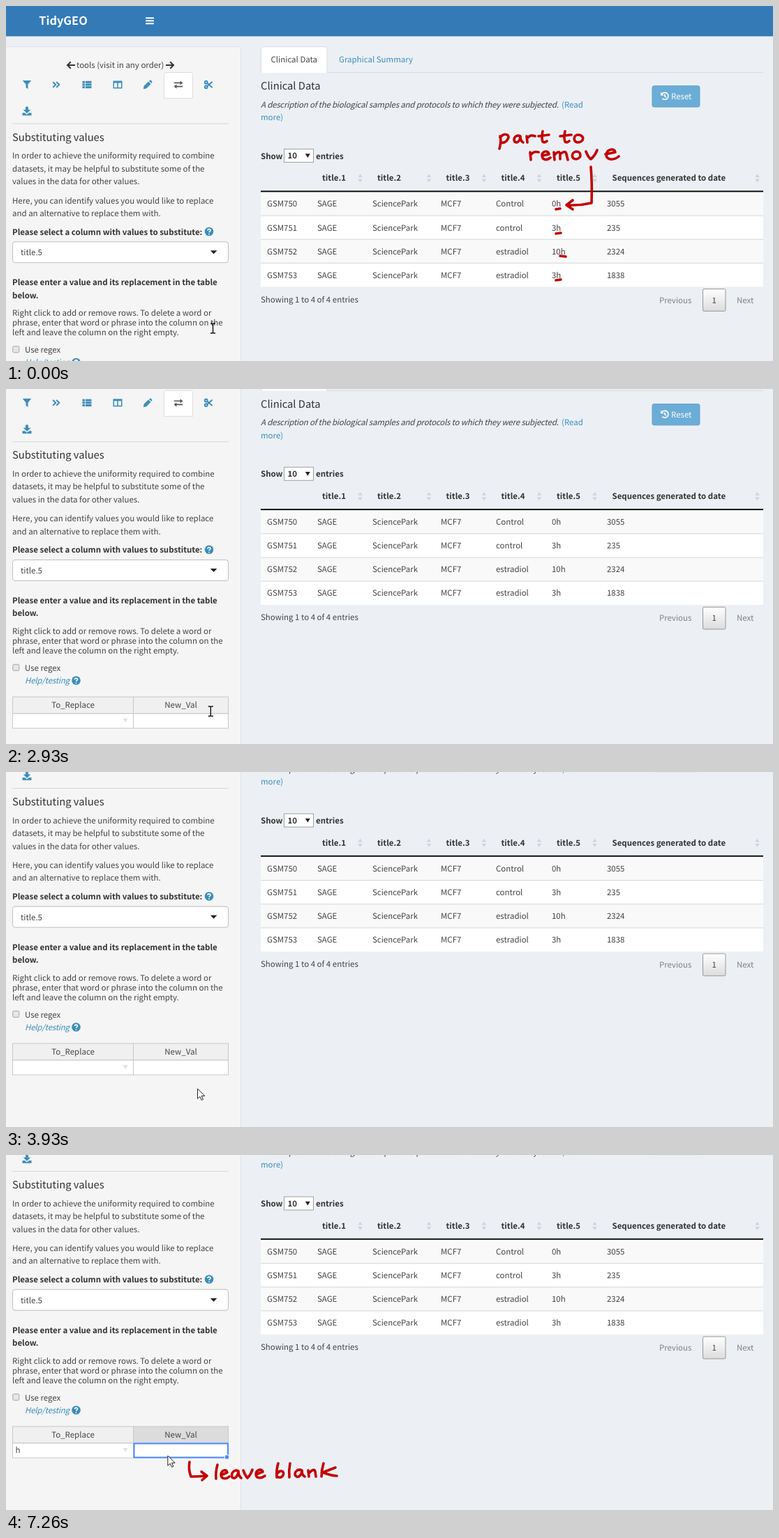
An HTML page for the animation above (8 s loop, 1099 by 510 pixels).

```html
<!DOCTYPE html>
<html lang="en">
<head>
<meta charset="utf-8">
<title>Substituting values</title>
<style>
html, body { margin: 0; width: 100%; height: 100%; overflow: hidden; background: #ecf0f5; }
svg { display: block; width: 100%; height: 100%; }
text {
  font-family: "Noto Sans CJK JP", "Noto Sans CJK SC", "Noto Sans CJK KR", "Noto Sans CJK", "Open Sans", sans-serif;
  font-size: 11.47px; fill: #444; text-rendering: geometricPrecision; white-space: pre;
}
.b { font-weight: 700; fill: #333; }
.h { font-size: 14.75px; fill: #333; }
.i { font-style: italic; letter-spacing: -.2px; }
.a { fill: #3c8dbc; }
.g { fill: #808080; }
.w { fill: #fff; }
.logo { font-size: 16.4px; font-weight: 600; fill: #fff; }
.m { text-anchor: middle; }
.line { fill: none; stroke: currentColor; stroke-width: 2; }
.ink { fill: none; stroke: #c40000; stroke-width: 3.6; stroke-linecap: round; stroke-linejoin: round; }
</style>
</head>
<body>
<svg id="stage" viewBox="0 0 1099 510" preserveAspectRatio="none"></svg>
<script>
const LOOP = 8000;
const BLUE = '#3c8dbc';

const text = (x, y, s, cls = '') => `<text x="${x}" y="${y}" class="${cls}">${s}</text>`;
const lines = (x, ys, list, cls) => list.map((s, i) => text(x, ys[i], s, cls)).join('');
const rect = (x, y, w, h, fill, more = '') =>
  `<rect x="${x}" y="${y}" width="${w}" height="${h}" fill="${fill}" ${more}/>`;
const path = (d, more = '') => `<path d="${d}" ${more}/>`;
const at = (x, y, body, color = BLUE) =>
  `<g transform="translate(${x} ${y})" fill="${color}" color="${color}">${body}</g>`;
const stroked = d => path(d, 'class="line"');

const icons = {
  filter: path('M-6.3-6h12.6l-4.8 5.6v6.6l-3-2.2v-4.4z'),
  forward: stroked('M-4.8-4l4 4-4 4M.2-4l4 4-4 4'),
  list: [-5.2, -1.5, 2.2].map(y => rect(-6.5, y, 3.6, 3, BLUE) + rect(-2, y, 8.5, 3, BLUE)).join(''),
  columns: path('M-6.5-5.5h13v11h-13zM-5-2.6v6.6h4.2v-6.6zM.8-2.6v6.6h4.2v-6.6z', 'fill-rule="evenodd"'),
  pencil: path('M-6.2 6.2l.8-4.2 6.5-6.5 3.4 3.4-6.5 6.5zM2-5.3l1.2-1.1h1.2l2 2v1.2l-1.1 1.2z'),
  swap: path('M-6.2-3.4h8.8v-2.2l3.8 3.1-3.8 3.1v-2.3h-8.8zM6.2 1.7h-8.8v-2.2l-3.8 3.1 3.8 3.1v-2.3h8.8z'),
  cut: stroked('M-1.8-2.2L5.6 4.2M-1.8 2.2L5.6-4.2') +
    '<g class="line"><circle cx="-3.3" cy="-3.3" r="1.9"/><circle cx="-3.3" cy="3.3" r="1.9"/></g>',
  save: path('M-1.9-6.3h3.8v4.3h3.4l-5.3 5.2-5.3-5.2h3.4zM-6.5 2.4h3.6l2.9 2.6 2.9-2.6h3.6v3.8h-13z'),
  left: stroked('M6 0h-10M-.2-4.7l-4.8 4.7 4.8 4.7'),
  right: stroked('M-6 0h10M.2-4.7l4.8 4.7-4.8 4.7'),
  help: '<circle r="6.3"/>' + path('M-2-1.4C-2-4 2.3-4 2-1.5C1.8 0 .1-.2 0 1.4M0 2.9v1.6',
    'fill="none" stroke="#fff" stroke-width="1.6"'),
  history: path('M-4.2-2.7A5 5 0 1 1-3.6 3.6M0-2.6v3l2 1.4', 'fill="none" stroke="#fff" stroke-width="1.7"') +
    path('M-6-5.5v4.7h4.7z'),
  sort: path('M-3.3-1.3h6.6l-3.3-4.8zM-3.3 1.3h6.6l-3.3 4.8z'),
};

function header() {
  return rect(0, -10, 1099, 53.5, '#337ab7') + text(82, 27, 'TidyGEO', 'logo m') +
    [16.2, 20.2, 24.2].map(y => rect(200, y, 12, 2.1, '#fff', 'rx=".6"')).join('');
}

function sidebar() {
  const tools = [['filter', 30], ['forward', 72], ['list', 116], ['columns', 160], ['pencil', 203], ['cut', 290]];
  return rect(-10, 58.5, 346.5, 800, '#f5f5f5', 'stroke="#dfe1e4" rx="3"') +
    at(93, 85, icons.left, '#333') + text(101, 89.3, 'tools (visit in any order)') + at(235, 85, icons.right, '#333') +
    path('M226.5 132.5V98.5q0-3 3-3h35q3 0 3 3v34z', 'fill="#fff" stroke="#ddd"') +
    tools.map(([name, x]) => at(x, 113, icons[name])).join('') +
    at(247, 113, icons.swap, '#555') + at(30, 151, icons.save) +
    rect(9, 168.5, 310, 1, '#d8d8d8') +
    text(9, 193.6, 'Substituting values', 'h') +
    lines(9, [219.4, 237.7, 256, 283.5, 301.8], [
      'In order to achieve the uniformity required to combine',
      'datasets, it may be helpful to substitute some of the',
      'values in the data for other values.',
      'Here, you can identify values you would like to replace',
      'and an alternative to replace them with.']) +
    text(9, 328.7, 'Please select a column with values to substitute:', 'b') + at(291, 324, icons.help) +
    rect(9.5, 338.7, 309, 30, '#fff', 'stroke="#bfbfbf" rx="3.5"') + text(21, 358, 'title.5') +
    path('M292.8 351.2h9.6l-4.8 5z', 'fill="#222"') +
    lines(9, [401.3, 419.6], ['Please enter a value and its replacement in the table', 'below.'], 'b') +
    lines(9, [445, 459.2, 473.3], [
      'Right click to add or remove rows. To delete a word or',
      'phrase, enter that word or phrase into the column on the',
      'left and leave the column on the right empty.']) +
    rect(9.8, 488.8, 9, 9, '#e6e6e6', 'stroke="#a5a5a5" rx="1.5"') + text(27, 498, 'Use regex') +
    text(27, 516, 'Help/testing', 'i a') + at(100.5, 512, icons.help);
}

function entryTable() {
  const border = 'stroke="#c8c8c8"';
  return rect(9.5, 535.5, 173, 24, '#f0f0f0', border + ' id="headL"') +
    rect(182.5, 535.5, 136, 24, '#f0f0f0', border + ' id="headR"') +
    rect(9.5, 559.5, 173, 21, '#fff', border) + rect(182.5, 559.5, 136, 21, '#fff', border) +
    text(96, 551.5, 'To_Replace', 'm') + text(250.5, 551.5, 'New_Val', 'm') +
    path('M167.5 566.5h7l-3.5 6z', 'fill="#e2e2e2"') +
    `<g id="typed">${text(13.5, 573.3, 'h')}</g>` +
    `<g id="options">${['0h', '3h', '10h'].map((s, i) =>
      rect(9.5, 580.5 + 21 * i, 173, 21, '#fff', border) + text(13.5, 594.5 + 21 * i, s)).join('')}</g>` +
    `<g id="pick"><rect id="pickBox" y="560" height="20" fill="none" stroke="#4b89ff" stroke-width="2"/>
     <rect id="pickDot" y="576.5" width="6" height="6" fill="#4b89ff" stroke="#fff"/></g>`;
}

function dataTable() {
  const xs = [374, 446, 525, 623, 702, 782, 861];
  const heads = [['title.1', 453, 507.5], ['title.2', 532, 606], ['title.3', 630.5, 685], ['title.4', 709.5, 764],
    ['title.5', 789, 843.5], ['Sequences generated to date', 868.5, 1076.5]];
  const rows = [['Control', '0h', 3055], ['control', '3h', 235], ['estradiol', '10h', 2324], ['estradiol', '3h', 1838]];
  return heads.map(([s, x, sx]) => text(x, 251.4, s, 'b') + at(sx, 247.3, icons.sort, '#d0d5dc')).join('') +
    rows.map((row, r) => {
      const y = 267 + 34.1 * r;
      const cells = ['GSM' + (750 + r), 'SAGE', 'SciencePark', 'MCF7', ...row];
      return rect(365, y, 720, 34.1, r % 2 ? '#fff' : '#f9f9f9') + (r ? rect(365, y - .5, 720, 1.2, '#dcdcdc') : '') +
        cells.map((s, c) => text(xs[c], y + 21.4, s)).join('');
    }).join('') + rect(365, 265.3, 720, 2, '#111');
}

function mainPanel() {
  return rect(365, 95, 720, 1, '#d6dade') +
    path('M365.5 96V61.5q0-3 3-3h88.500q3 0 3 3V96', 'fill="#fff" stroke="#d8dbe0"') +
    text(379.5, 81.2, 'Clinical Data') + text(477, 81.2, 'Graphical Summary', 'a') +
    text(365, 120, 'Clinical Data', 'h') +
    text(365, 145.6, 'A description of the biological samples and protocols to which they were subjected.', 'i') +
    text(796, 145.6, '(Read', 'a') + text(365, 163.9, 'more)', 'a') +
    rect(926, 114.7, 68, 30.4, '#6badd6', 'stroke="#62a3cd" rx="2.5"') +
    at(944, 129.3, icons.history, '#fff') + text(953, 133.8, 'Reset', 'w') +
    text(365, 219.6, 'Show', 'b') + rect(398.5, 205.5, 42, 19, '#fff', 'stroke="#a0a0a0"') +
    text(403.5, 219.4, '10', 'b') + path('M428.800 212.3h7l-3.5 5.6z', 'fill="#222"') + text(444, 219.6, 'entries', 'b') +
    dataTable() + text(365, 425.6, 'Showing 1 to 4 of 4 entries') +
    text(936, 426.6, 'Previous', 'g') +
    rect(998.5, 406.500, 32.5, 31.8, 'url(#page)', 'stroke="#979797" rx="1.5"') +
    text(1014.7, 426.6, '1', 'm') + text(1047, 426.6, 'Next', 'g');
}

const notes = {
  remove: [
    'M708 187Q710 195 707 205M708 189C714 181 723 185 719 191C717 196 712 197 709 196',
    'M737 187C731 184 726 190 729 195C733 198 737 193 737 187Q737 194 741 196',
    'M746 187L747 196M747 190Q751 184 758 187',
    'M769 180Q767 190 769 195Q772 197 775 194M763 187L778 185',
    'M801 180Q799 189 801 195Q804 197 807 194M794 187L810 185',
    'M820 185C813 185 812 195 819 196C828 196 830 186 820 185',
    'M751 210L752 221M752 214Q756 208 763 210',
    'M768 215L778 213C777 207 769 208 768 214C768 222 775 222 780 218',
    'M785 210L786 221M786 214Q793 206 794 213V220M794 213Q802 206 803 213L805 221',
    'M817 209C810 210 809 220 817 220C825 219 825 209 817 209',
    'M831 209Q834 217 838 220Q844 215 847 207',
    'M859 213L873 210C872 204 862 205 860 213C860 222 871 222 878 216',
    'M838 231Q840 255 839 283Q822 287 804 286M812 279L803 286L812 292',
    'M788 292L794 291M788 327L795 326M794 359L802 360M788 394L795 393',
  ],
  blank: [
    'M263 441Q261 452 265 462Q275 462 286 461M280 455L288 461L281 467',
    'M303 445Q300 456 301 465',
    'M308 460L317 456C316 450 308 453 308 460C309 466 316 466 320 462',
    'M333 454C327 451 322 457 324 463C328 467 333 460 333 454Q333 461 337 464',
    'M340 453Q343 461 346 464Q351 459 353 452',
    'M358 459L368 455C366 449 358 453 358 459C359 466 367 464 371 461',
    'M390 443Q387 453 388 463M388 459C392 451 400 454 397 460C395 464 391 464 388 462',
    'M407 443Q405 453 406 463',
    'M424 453C418 450 412 456 415 461C419 465 424 459 424 453Q424 460 428 462',
    'M433 453L434 462M434 457Q442 449 443 455L444 462',
    'M455 443Q452 453 452 462M472 449L454 456Q463 460 474 461',
  ],
};
const note = id => `<g id="${id}" class="ink">${path(notes[id].join(''))}</g>`;

const stage = document.getElementById('stage');
stage.innerHTML =
  `<defs><linearGradient id="page" x2="0" y2="1"><stop stop-color="#fff"/><stop offset="1" stop-color="#dcdcdc"/></linearGradient></defs>` +
  rect(0, 0, 1099, 510, '#ecf0f5') +
  `<g id="content">${header() + sidebar() + entryTable() + mainPanel()}</g>` +
  note('remove') + note('blank') +
  `<g id="beam">${path('M-3.5-7h2.500L0-6L1-7H3.500M-3.500 7h2.500L0 6L1 7H3.500M0-6V6', 'fill="none" stroke="#111" stroke-width="1.4"')}</g>` +
  `<g id="arrow">${path('M0 0V14.3L3.4 11.2L5.7 16.4L8 15.4L5.700 10.300H10.300Z', 'fill="#fff" stroke="#222"')}</g>`;

const el = id => document.getElementById(id);
const show = (id, on) => el(id).setAttribute('display', on ? 'inline' : 'none');
const set = (id, name, value) => el(id).setAttribute(name, value);
const move = (id, x, y) => set(id, 'transform', `translate(${x} ${y})`);
const clamp = v => Math.max(0, Math.min(1, v));
const ease = v => v * v * (3 - 2 * v);
// Progress from start to end, advancing in a fixed number of jumps.
const stepped = (t, start, end, steps) =>
  t < start ? 0 : clamp((Math.floor((t - start) / (end - start) * (steps - 1) + .01) + 1) / steps);

const SCROLL = [1, 10, 25.6, 42, 59, 76, 93.2, 105, 115, 124, 132, 138, 142.4, 144.6, 145.5];
const scrollAt = t => t < 2460 ? 0 : SCROLL[Math.min(SCROLL.length - 1, Math.floor((t - 2460) / 77.4))];

function draw(t) {
  move('content', 0, -scrollAt(t));
  show('remove', t < 500);
  show('blank', t >= 7260);

  const toLeft = ease(stepped(t, 3780, 4550, 11));
  const toRight = ease(stepped(t, 6260, 6800, 8));
  show('beam', t < 3780);
  show('arrow', t >= 3780);
  move('beam', t < 2000 ? 296.5 : 293.3, 463);
  move('arrow', 287 - 143.5 * toLeft + 88.3 * toRight, 458 - 34.5 * toLeft + 8.5 * toRight);

  const left = t >= 4620 && t < 6950, right = t >= 6950;
  set('headL', 'fill', left ? '#dcdcdc' : '#f0f0f0');
  set('headR', 'fill', right ? '#dcdcdc' : '#f0f0f0');
  show('pick', left || right);
  set('pickBox', 'x', right ? 183.5 : 10);
  set('pickBox', 'width', right ? 134.5 : 172);
  set('pickDot', 'x', right ? 313.5 : 179.5);
  show('typed', t >= 5710);
  show('options', t >= 5710 && t < 6950);
}

const begin = performance.now();
function tick() {
  draw((performance.now() - begin) % LOOP);
  requestAnimationFrame(tick);
}
tick();
</script>
</body>
</html>
```
